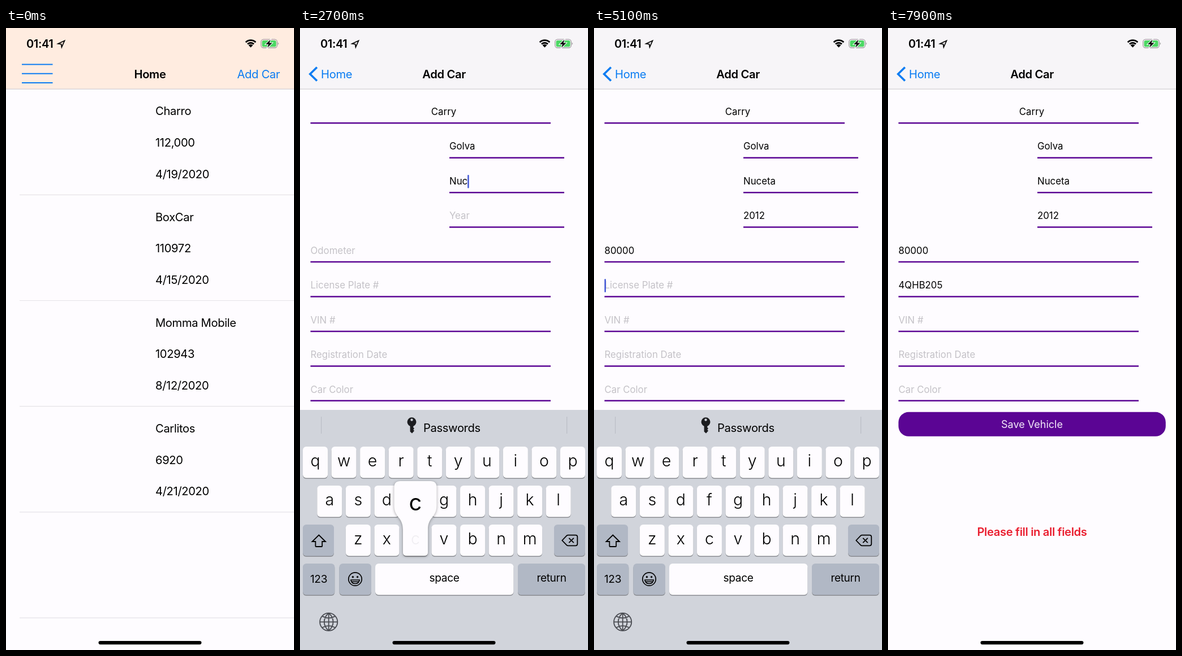
Animation, 509 px wide and 1101 px high, one loop 8000 ms. Source, as an HTML page with a canvas:

```html
<!DOCTYPE html>
<html lang="en">
<head>
<meta charset="utf-8">
<title>Add Car</title>
<style>
  html, body { margin: 0; width: 100%; height: 100%; overflow: hidden; background: #fefcff; }
  canvas { display: block; }
</style>
</head>
<body>
<canvas width="509" height="1101"></canvas>
<script>
const W = 509, H = 1101, LOOP = 8000, STEP = 100;
const ctx = document.querySelector('canvas').getContext('2d');
const PAPER = '#fefcff', BLUE = '#0a7cf2', PURPLE = '#5b0594', KEYS = '#d1d4db', DARK_KEY = '#b1b8c5';

const cars = [
  ['Charro', '112,000', '4/19/2020'],
  ['BoxCar', '110972', '4/15/2020'],
  ['Momma Mobile', '102943', '8/12/2020'],
  ['Carlitos', '6920', '4/21/2020'],
];
const labels = ['Car Name', 'Make', 'Model', 'Year', 'Odometer', 'License Plate #',
  'VIN #', 'Registration Date', 'Car Color'];

// One character per step: ^ is shift, ~ switches letters and digits, a space waits.
const typing = [
  [5, '^Carry'],
  [11, '  ^ Golva'],
  [21, '  ^ Nuceta'],
  [31, ' 2012'],
  [38, '       80000'],
  [50, '     ~4~ ^Q^H^B~205'],
  [69, ''],
];
const caretAlpha = [0, 0, 1, 1, 0, .45, 1];

function text(str, x, y, size = 20.2, color = '#000', align = 'left', weight = 400) {
  ctx.font = `${weight} ${size}px Inter, sans-serif`;
  ctx.letterSpacing = size > 19 && size < 25 ? `${-.018 * size}px` : '0px';
  ctx.textAlign = align;
  ctx.fillStyle = color;
  ctx.fillText(str, x, y);
  return ctx.measureText(str).width;
}
function box(x, y, w, h, color, r = 0) {
  ctx.fillStyle = color;
  ctx.beginPath();
  ctx.roundRect(x, y, w, h, r);
  ctx.fill();
}
function stroke(d, width = 2, color = '#000') {
  ctx.strokeStyle = color;
  ctx.lineWidth = width;
  ctx.stroke(new Path2D(d));
}
function fill(d, color = '#000') {
  ctx.fillStyle = color;
  ctx.fill(new Path2D(d), 'evenodd');
}
function at(x, y, draw, alpha = 1) {
  ctx.save();
  ctx.translate(x, y);
  ctx.globalAlpha *= alpha;
  draw();
  ctx.restore();
}
const circle = (x, y, r) => `M${x - r} ${y}a${r} ${r} 0 1 0 ${2 * r} 0a${r} ${r} 0 1 0 ${-2 * r} 0z`;

function statusBar() {
  text('01:41', 36, 35, 20, '#000', 'left', 600);
  stroke('M103.5 22.5L92 27.8L97.6 28.6L98.4 34Z', 1.7);
  for (const r of [12.4, 7.8]) {
    const s = r * .707;
    stroke(`M${432.5 - s} ${34 - s}A${r} ${r} 0 0 1 ${432.5 + s} ${34 - s}`, 2.9);
  }
  fill('M432.5 34.5L428.6 30.4A5.4 5.4 0 0 1 436.4 30.4Z');
  ctx.beginPath();
  ctx.roundRect(450.7, 20.2, 28.6, 14.8, 4.5);
  ctx.strokeStyle = '#a3a0a2';
  ctx.lineWidth = 1.3;
  ctx.stroke();
  box(452.5, 22, 25, 11.2, '#4bd863', 2.8);
  fill('M480.6 25.3q3 2.3 0 4.6z', '#a3a0a2');
  const bolt = 'M467.5 20.5L459 28.8H464L462 34.8L470.5 26.4H465.5Z';
  stroke(bolt, 2, '#fff');
  fill(bolt);
}

function navBar(color) {
  box(0, 0, W, 108, color);
  box(0, 107.6, W, 1.2, '#d3d0d4');
}
function homeNav(pressed) {
  navBar('#ffece0');
  for (const y of [64.5, 80.7, 97]) stroke(`M28 ${y}H82.5`, 2.1, BLUE);
  text('Home', 254.5, 88.5, 20.2, '#000', 'center', 600);
  at(0, 0, () => text('Add Car', 484, 88.5, 20.2, BLUE, 'right'), pressed ? .3 : 1);
}
function formNav() {
  navBar('#f7f5f8');
  stroke('M30 69.5L17.8 81.5L30 93.5', 3.6, BLUE);
  text('Home', 37, 88.5, 20.2, BLUE);
  text('Add Car', 254.5, 88.5, 20.2, '#000', 'center', 600);
}

function homeBody() {
  box(0, 108, W, H, PAPER);
  for (let i = 0; i < 5; i++) {
    cars[i]?.forEach((line, j) => text(line, 264, 154.3 + 187.2 * i + 55.6 * j));
    box(24, 294.7 + 187.2 * i, W, 1.2, '#e5e3e7');
  }
}

function formBody(step, state) {
  box(0, 108, W, H, PAPER);
  labels.forEach((label, i) => {
    const y = 154 + 61.45 * i, narrow = i > 0 && i < 4, left = narrow ? 264 : 18.5;
    const value = state.values[i], middle = i === 0;
    const x = middle ? 254 : left;
    const w = text(value || label, x, y, 16.8, value ? '#000' : '#c4c2c7', middle ? 'center' : 'left');
    box(left, y + 13, narrow ? 203 : 424.5, 2.5, PURPLE);
    if (state.focus === i) {
      const end = middle ? x + (value ? w / 2 : -w / 2) : x + (value ? w : 0);
      at(end, y - 17, () => box(0, 0, 2.5, 23.5, '#4257d6', 1), caretAlpha[step % 7]);
    }
  });
  const pressed = step === 76 || step === 77;
  at(0, 0, () => {
    box(18.5, 679.8, 472.3, 43, PURPLE, 18);
    text('Save Vehicle', 254.5, 708, 18, '#f4eaf9', 'center');
  }, pressed ? .5 : 1);
  if (step >= 78) text('Please fill in all fields', 254.5, 898.5, 20.2, '#ea1f30', 'center', 600);
}

function key(x, y, w, h, color = PAPER) {
  box(x, y + 1.4, w, h, '#8a8c91', 6);
  box(x, y, w, h, color, 6);
}
function backspace(x, y) {
  at(x, y, () => {
    stroke('M-13.5 0L-5.5 -8.3Q-4.5 -9.3 -3 -9.3H10Q13.5 -9.3 13.5 -6V6Q13.5 9.3 10 9.3H-3Q-4.5 9.3 -5.5 8.3Z', 1.8);
    stroke('M-1.5 -4.2L7 4.2M7 -4.2L-1.5 4.2', 1.8);
  });
}

function popup(c, x, y, w) {
  const l = Math.max(2, x - 15.5), r = Math.min(W - 2, x + w + 15.5), e = x + w, top = y - 77;
  ctx.save();
  ctx.shadowColor = 'rgba(0,0,0,.35)';
  ctx.shadowBlur = 5;
  ctx.shadowOffsetY = 1;
  fill(`M${l + 11} ${top}H${r - 11}Q${r} ${top} ${r} ${top + 11}V${y - 34}
    C${r} ${y - 12} ${e} ${y - 14} ${e} ${y + 9}V${y + 49}Q${e} ${y + 55} ${e - 6} ${y + 55}
    H${x + 6}Q${x} ${y + 55} ${x} ${y + 49}V${y + 9}
    C${x} ${y - 14} ${l} ${y - 12} ${l} ${y - 34}V${top + 11}Q${l} ${top} ${l + 11} ${top}Z`, PAPER);
  ctx.restore();
  text(c, x + w / 2, y + 35, 28.5, '#f0eef2', 'center', 300);
  text(c, (l + r) / 2, y - 25, 40, '#000', 'center');
}

function letterPad({ shift, digits, pressed }) {
  box(0, 676, W, H - 676, KEYS);
  box(37, 688, 1.2, 30, '#bbbec6');
  box(471, 688, 1.2, 30, '#bbbec6');
  fill(circle(197.5, 697.3, 8) + circle(197.5, 693.6, 2.2), '#1c1d20');
  fill('M194.6 704H200.2V707L202 709L200.2 711L202 713L198 717.5L194.6 714.5Z', '#1c1d20');
  text('Passwords', 218, 714.5);

  const upper = shift || /[A-Z]/.test(pressed);
  const rows = digits ? ['1234567890', '-/:;()$&@"', ".,?!'"] : ['qwertyuiop', 'asdfghjkl', 'zxcvbnm'];
  let held;
  rows.forEach((row, i) => {
    const wide = row.length === 5, w = wide ? 63 : 44, pitch = wide ? 70.5 : 50.55;
    const y = 741 + 69 * i, x0 = (W - pitch * (row.length - 1) - w) / 2;
    [...row].forEach((ch, j) => {
      const c = upper ? ch.toUpperCase() : ch, x = x0 + pitch * j;
      key(x, y, w, 55.5);
      text(c, x + w / 2, y + 35, 28.5, '#000', 'center', 300);
      if (c === pressed) held = [c, x, y, w];
    });
  });

  key(5, 879, 55, 55.5, upper && !digits ? PAPER : DARK_KEY);
  if (digits) text('#+=', 32.5, 913, 18, '#000', 'center');
  else {
    const arrow = 'M33.3 897.5L45 909H39.2V917Q39.2 918 38.2 918H28.4Q27.4 918 27.4 917V909H21.6Z';
    stroke(arrow, 1.8);
    if (upper) fill(arrow);
  }
  key(449, 879, 55, 55.5, DARK_KEY);
  backspace(476.8, 907);
  key(5, 948, 56.3, 55.5, DARK_KEY);
  text(digits ? 'ABC' : '123', 33, 982, 19.1, '#000', 'center');
  key(69.5, 948, 56.5, 55.5, DARK_KEY);
  stroke(circle(97.5, 975.5, 11.7), 1.7);
  fill(circle(93.4, 971.8, 1.7) + circle(101.6, 971.8, 1.7));
  stroke('M89.8 977H105.2Q104 983.5 97.5 983.5Q91 983.5 89.8 977Z M91 980H104', 1.5);
  key(133, 948, 244.5, 55.5);
  text('space', 255, 980, 19.1, '#000', 'center');
  key(385, 948, 119, 55.5, DARK_KEY);
  text('return', 444.5, 980, 19.1, '#000', 'center');

  at(50.7, 1051.3, () => stroke(circle(0, 0, 15.6) +
    'M0 -15.6V15.6M-15.6 0H15.6M0 -15.6C-10.5 -7 -10.5 7 0 15.6C10.5 7 10.5 -7 0 -15.6' +
    'M-11.5 -10.2Q0 -3.5 11.5 -10.2M-11.5 10.2Q0 3.5 11.5 10.2', 1.8, '#4a4c52'));
  if (held) popup(...held);
}

function numberPad({ pressed }) {
  box(0, 731, W, H - 731, KEYS);
  const hints = ['', '', 'ABC', 'DEF', 'GHI', 'JKL', 'MNO', 'PQRS', 'TUV', 'WXYZ'];
  hints.forEach((hint, n) => {
    const slot = n ? n - 1 : 10;
    const x = 7.5 + 167.2 * (slot % 3), y = 738.5 + 68.8 * Math.floor(slot / 3);
    key(x, y, 159.7, 60, pressed === String(n) ? DARK_KEY : PAPER);
    text(n, x + 79.8, y + (n ? 32 : 40), 30, '#000', 'center');
    ctx.font = '600 12.3px Inter, sans-serif';
    ctx.letterSpacing = '2.5px';
    ctx.fillText(hint, x + 81, y + 50);
  });
  backspace(425, 973.5);
}

function stateAt(step) {
  const state = { values: [], focus: -1, shift: false, digits: false, pressed: '' };
  typing.forEach(([start, script], field) => {
    if (step < start) return;
    Object.assign(state, { focus: field, shift: false, digits: false, pressed: '' });
    state.values[field] = '';
    [...script.slice(0, step - start + 1)].forEach((c, i) => {
      if (c === '^') state.shift = true;
      else if (c === '~') state.digits = !state.digits;
      else if (c !== ' ') {
        state.values[field] += c;
        state.shift = false;
        if (start + i === step) state.pressed = c;
      }
    });
  });
  if (step >= 74) state.focus = -1;
  return state;
}

function draw(step) {
  const state = stateAt(step);
  const push = step < 2 ? 0 : step < 3 ? .6 : 1;
  if (push < 1) {
    at(-.3 * W * push, 0, homeBody);
    homeNav(step === 1);
  }
  if (push > 0) {
    at(W * (1 - push), 0, () => formBody(step, state));
    at(0, 0, formNav, push);
  }
  statusBar();
  const raised = step === 4 || step === 74 ? .5 : step > 4 && step < 74 ? 1 : 0;
  const pad = state.focus === 3 || state.focus === 4 ? numberPad : letterPad;
  if (raised) at(0, (1 - raised) * 425, () => pad(state));
  box(163.5, 1085, 182, 6.2, '#000', 3.1);
}

function tick(now) {
  draw(Math.floor(now % LOOP / STEP));
  requestAnimationFrame(tick);
}
requestAnimationFrame(tick);
</script>
</body>
</html>
```
